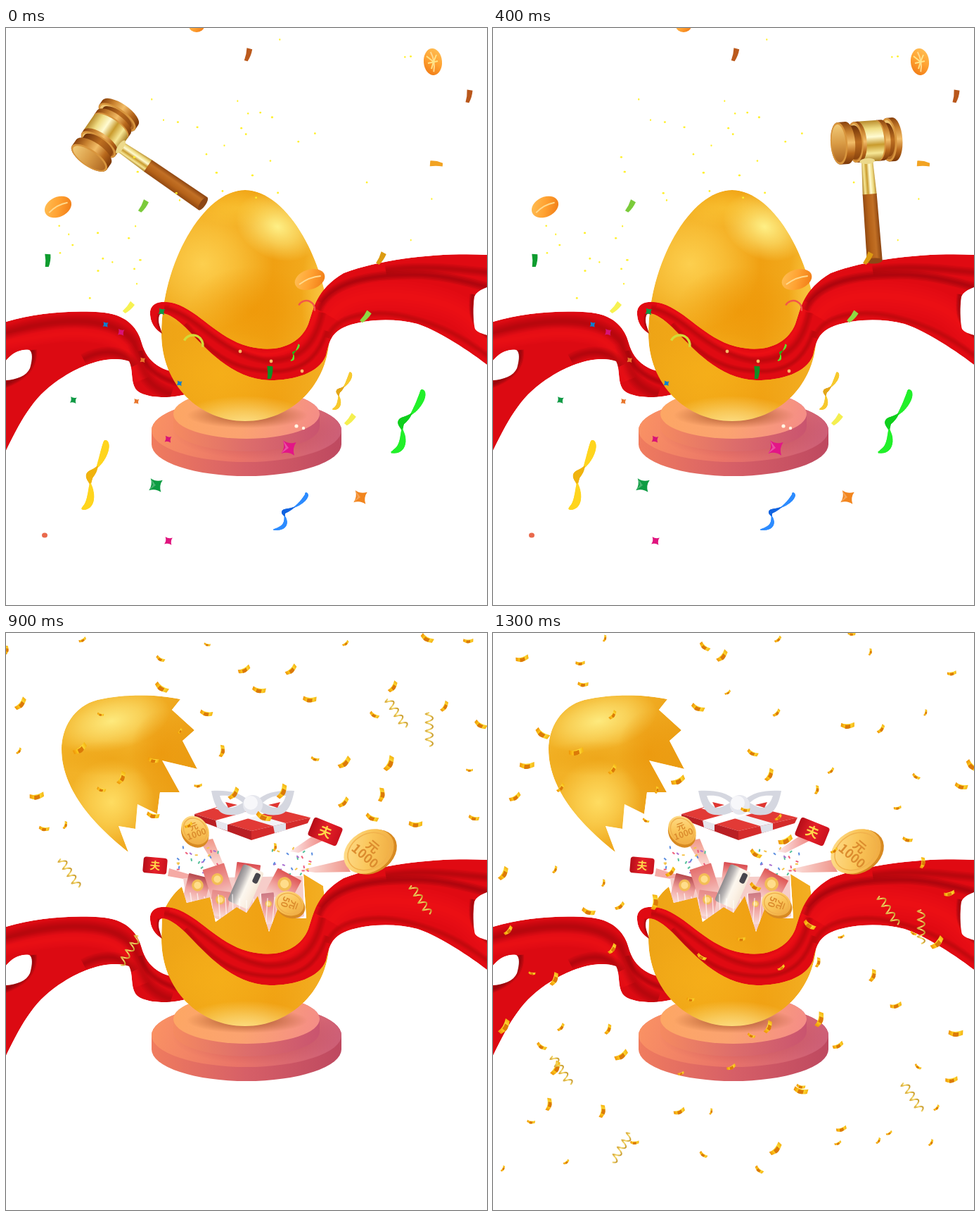
These frames come from a looping animation (684 px wide and 819 px high, 1.5 s). An HTML page with a canvas:

```html
<!DOCTYPE html>
<html lang="zh">
<head>
<meta charset="utf-8">
<style>
html, body { margin: 0; width: 100%; height: 100%; overflow: hidden; background: #fff; }
canvas { display: block; }
</style>
</head>
<body>
<canvas id="stage" width="684" height="819"></canvas>
<script>
const ctx = document.getElementById('stage').getContext('2d');
const TAU = Math.PI * 2;
const STARTS = [0, 200, 400, 600, 800, 900, 1100, 1300];
const LOOP = 1500;

// ---------- helpers ----------
function at(x, y, deg, draw) {
  ctx.save();
  ctx.translate(x, y);
  ctx.rotate(deg * Math.PI / 180);
  draw();
  ctx.restore();
}
function ramp(x0, y0, x1, y1, ...colors) {
  const g = ctx.createLinearGradient(x0, y0, x1, y1);
  colors.forEach((c, i) => g.addColorStop(i / (colors.length - 1), c));
  return g;
}
function fill(path, style) {
  ctx.fillStyle = style;
  ctx.fill(typeof path === 'string' ? new Path2D(path) : path);
}
function line(d, style, width) {
  ctx.strokeStyle = style;
  ctx.lineWidth = width;
  ctx.stroke(new Path2D(d));
}
function oval(x, y, rx, ry, style) {
  ctx.beginPath();
  ctx.ellipse(x, y, rx, ry, 0, 0, TAU);
  ctx.fillStyle = style;
  ctx.fill();
}
function box(w, h, r, style) {
  ctx.beginPath();
  ctx.roundRect(-w / 2, -h / 2, w, h, r);
  ctx.fillStyle = style;
  ctx.fill();
}
function glow(x, y, rx, ry, rgb, alpha, deg = 0) {
  at(x, y, deg, () => {
    ctx.scale(rx, ry);
    const g = ctx.createRadialGradient(0, 0, 0, 0, 0, 1);
    g.addColorStop(0, `rgba(${rgb},${alpha})`);
    g.addColorStop(0.5, `rgba(${rgb},${alpha * 0.55})`);
    g.addColorStop(1, `rgba(${rgb},0)`);
    oval(0, 0, 1, 1, g);
  });
}
// Soft stroke built from narrowing translucent layers.
function fold(d, rgb, width, alpha = 0.08) {
  for (let k = 5; k > 0; k--) line(d, `rgba(${rgb},${alpha})`, width * k / 5);
}
function clipped(path, draw) {
  ctx.save();
  ctx.clip(path);
  draw();
  ctx.restore();
}
function noise(seed) {
  const v = Math.sin(seed * 127.1 + 3.7) * 43758.5453;
  return v - Math.floor(v);
}
function scatter(count, seed, x, y, w, h, draw) {
  for (let i = 0; i < count; i++) draw(x + noise(seed + i) * w, y + noise(seed + i + 500) * h, i);
}

// ---------- pedestal, egg, cloth ----------
function disk(y, rx, ry, h, top, side) {
  ctx.beginPath();
  ctx.ellipse(342, y + h, rx, ry, 0, 0, Math.PI);
  ctx.ellipse(342, y, rx, ry, 0, Math.PI, TAU);
  ctx.fillStyle = ramp(342 - rx, 0, 342 + rx, 0, ...side);
  ctx.fill();
  oval(342, y, rx, ry, ramp(342 - rx, y - ry, 342 + rx, y + ry, ...top));
}
function pedestal() {
  disk(571, 135, 45, 20, ['#fb9463', '#ea7468', '#c95c78'], ['#f07c5e', '#d65f67', '#be4960']);
  glow(354, 572, 118, 40, '160,45,75', 0.45);
  disk(548, 104, 35, 18, ['#fda763', '#fba370', '#f48b89'], ['#f58a60', '#dd6d6b', '#c9546f']);
  glow(343, 550, 86, 18, '150,65,25', 0.75);
}

const EGG = 'M340 230C280 230 221 336 221 434C221 507 275 558 340 558C405 558 460 507 460 434C460 336 400 230 340 230Z';
const SHELL = 'M222 400Q232 374 250 360L257 383L290 375L298 410L328 389L342 397L358 373L374 424L389 384L411 405L427 405L423 342L451 359L460 434C460 507 405 558 340 558C275 558 221 507 221 434Z';

function eggBody(outline, whole) {
  const p = new Path2D(outline);
  clipped(p, () => {
    fill(p, ramp(221, 0, 460, 0, '#eea416', '#f2a818', '#f0a012', '#f3b024'));
    if (whole) {
      glow(280, 335, 100, 95, '255,214,88', 0.85);
      glow(386, 282, 62, 46, '255,244,140', 0.95, 25);
      glow(330, 255, 60, 28, '255,212,70', 0.5);
      glow(350, 400, 90, 62, '238,148,4', 0.6);
      glow(448, 380, 28, 100, '255,215,90', 0.5);
    }
    glow(310, 490, 110, 60, '247,178,26', 0.6);
    glow(340, 566, 105, 44, '255,232,150', 0.95);
  });
}

const CLOTH_LEFT = new Path2D('M0 417C45 404 96 400 140 404C174 408 188 428 193 447C201 476 225 490 256 489L258 519C235 527 194 526 184 512C177 501 181 484 175 473C150 464 111 476 82 495C42 519 24 551 0 600L0 500C15 499 29 494 34 483C38 470 38 460 33 457C20 455 8 462 0 472Z');
const CLOTH_RIGHT = new Path2D('M222 434C212 428 204 418 205 402C207 389 222 386 240 391C275 402 300 440 345 452C385 462 418 450 430 420C438 398 440 372 480 348C540 326 620 319 684 322L684 368C674 372 668 376 666 382C664 396 664 416 667 427C670 432 678 434 684 436L684 478C650 452 610 428 585 420C550 411 510 414 485 423C462 432 460 445 455 465C445 490 410 500 375 500C320 498 285 455 255 425C240 410 222 400 218 408C215 418 220 425 222 434Z');
const DARK = '105,4,10', BRIGHT = '255,30,32';

function clothLeft() {
  clipped(CLOTH_LEFT, () => {
    fill(CLOTH_LEFT, '#dc0a12');
    fold('M-9 436C60 412 150 404 182 446C192 475 190 505 235 520', DARK, 20, 0.07);
    fold('M-9 448C55 436 95 428 140 438C172 446 180 470 192 500', BRIGHT, 24);
    fold('M38 457C40 484 20 498 -9 508', DARK, 12, 0.15);
    fold('M110 470C140 454 170 458 181 480', DARK, 16);
    fold('M192 458C198 486 222 500 258 508', DARK, 10);
  });
}
function clothRight() {
  clipped(CLOTH_RIGHT, () => {
    fill(CLOTH_RIGHT, '#e00a12');
    fold('M444 400C460 362 510 350 580 350C625 350 660 362 694 370', DARK, 14, 0.1);
    fold('M540 344C590 336 640 342 694 348', DARK, 14, 0.07);
    fold('M462 410C480 380 530 374 590 384C640 392 660 406 694 450', BRIGHT, 44);
    fold('M458 440C466 408 520 398 570 410C620 422 650 438 694 472', DARK, 10, 0.05);
    fold('M664 378C660 405 664 424 690 440', DARK, 9, 0.12);
    fold('M225 398C270 403 302 462 370 472C425 474 442 440 450 404', DARK, 12, 0.06);
    fold('M255 420C300 475 340 489 390 487C430 483 446 460 456 430', DARK, 9, 0.06);
    fold('M233 393C285 410 300 452 365 463C425 464 436 420 444 388', BRIGHT, 10);
    fold('M218 406C214 420 220 428 222 434', DARK, 6, 0.1);
  });
}

// ---------- hammer ----------
const WOOD = ['#8a420d', '#c9822f', '#f2bd68', '#b9691c', '#7a3708'];
const GROOVE = ['#6d3007', '#bd6f21', '#8a430d'];
const GOLD = ['#b88a2b', '#efdc83', '#fffbd2', '#c99b2d', '#f7e795', '#a87b20'];

// A short drum whose axis is local y, seen from the +y end.
function drum(y0, y1, r, colors) {
  const ry = r * 0.4;
  ctx.beginPath();
  ctx.ellipse(0, y0, r, ry, 0, Math.PI, TAU);
  ctx.ellipse(0, y1, r, ry, 0, 0, Math.PI);
  ctx.closePath();
  ctx.fillStyle = ramp(-r, 0, r, 0, ...colors);
  ctx.fill();
  if (colors !== WOOD) return;
  oval(0, y1, r, ry, '#d8953d');
  oval(0, y1 + 0.5, r - 3, ry - 2, ramp(-r, 0, r, 0, '#f4cf7c', '#d99b45', '#a85f1c'));
}
function hammer(x, y, deg) {
  at(x, y, deg, () => {
    fill('M26 -8L76 -10V10L26 8Z', ramp(0, -10, 0, 10, ...GOLD));
    fill('M75 -10L170 -11L173 0L170 11L75 10Z', ramp(0, -11, 0, 11, '#8a4310', '#c27025', '#b56219', '#8f4711'));
    oval(170, 0, 4, 11, '#8c4716');
    drum(-40, -32, 31, WOOD);
    drum(-32, -22, 24, GROOVE);
    drum(-24, -17, 29, WOOD);
    drum(-15, 10, 29, GOLD);
    drum(10, 15, 29, WOOD);
    drum(15, 25, 24, GROOVE);
    drum(27, 38, 30, WOOD);
    oval(28, 0, 4, 11, '#ecd98b');
  });
}
const SWINGS = [[140, 153, 34.5], [368, 138, 44.5], [530, 161, 85.7], [449, 208, 44.5], [417, 228, 32]];

// ---------- loose bits around the whole egg ----------
function star(x, y, r, color) {
  at(x, y, 8, () => {
    ctx.scale(r, r);
    fill('M-.86 -.86Q0 -.42 .86 -.86Q.42 0 .86 .86Q0 .42 -.86 .86Q-.42 0 -.86 -.86Z', color);
    if (r > 8) fill('M-.86 -.86L0 0L-.86 .86L-.4 0Z', 'rgba(255,255,255,.25)');
  });
}
function strip(x, y, deg, color) {
  at(x, y, deg, () => fill('M-9 -4Q0 -5 9 -2V3Q0 2 -9 4Z', color));
}
function bean(x, y, rx, ry, deg) {
  at(x, y, deg, () => {
    oval(0, 0, rx, ry, ramp(-rx, -ry, rx, ry, '#ffc35a', '#ffa232', '#ee7410'));
    line(`M${-rx * 0.75} 2Q0 -4 ${rx * 0.75} 0`, '#ffd98c', 2);
  });
}
// Twisted paper ribbon running down-left from (x, y); it narrows wherever it turns over.
function twist(x, y, w, h, light, dark) {
  const point = t => [x - w * (t - 0.16 * Math.sin(t * TAU * 1.5)), y + h * (t - 0.05 * Math.sin(t * TAU * 2))];
  ctx.lineCap = 'round';
  for (let t = 0; t < 1; t += 0.02) {
    const turn = Math.sin(t * TAU * 1.5);
    ctx.beginPath();
    ctx.moveTo(...point(t));
    ctx.lineTo(...point(t + 0.02));
    ctx.strokeStyle = turn > 0 ? light : dark;
    ctx.lineWidth = (0.02 + 0.09 * Math.abs(turn)) * h;
    ctx.stroke();
  }
  ctx.lineCap = 'butt';
}
function arc(x, y, r, color, width) {
  ctx.beginPath();
  ctx.arc(x, y, r, Math.PI * 1.15, TAU + 0.2);
  ctx.strokeStyle = color;
  ctx.lineWidth = width;
  ctx.stroke();
}
function looseBits() {
  const speck = (x, y, i) => oval(x, y, 1 + noise(i) * 0.8, 1.4, '#fff02d');
  scatter(20, 10, 180, 100, 200, 145, speck);
  scatter(14, 40, 75, 280, 130, 105, speck);
  scatter(10, 70, 340, 10, 300, 310, speck);

  const hues = ['#0a7fd0', '#109a45', '#e8762c', '#d81376'];
  scatter(8, 20, 90, 370, 160, 220, (x, y, i) => star(x, y, 4 + i % 2, hues[i % 4]));
  star(213, 649, 10, '#0d9c42');
  star(402, 596, 11, '#e31587');
  star(504, 666, 10, '#f2851e');
  star(231, 728, 6, '#e0147e');

  strip(344, 38, 105, '#bb5a1d');
  strip(658, 97, 100, '#b9571b');
  strip(612, 193, 4, '#f2a322');
  strip(195, 253, 120, '#7bcb3b');
  strip(59, 330, 92, '#0e9c2f');
  strip(174, 397, 132, '#f7f252');
  strip(533, 327, 118, '#dc9b12');
  strip(511, 410, 128, '#8ed943');
  strip(375, 489, 92, '#118d25');
  strip(489, 556, 130, '#f4ef50');

  bean(74, 254, 20, 14, -25);
  bean(432, 357, 22, 14, -18);
  bean(607, 48, 19, 13, 85);
  bean(271, -3, 11, 9, 0);
  line('M598 40L608 48L605 58M608 48L612 38M600 50L614 47', '#ffe487', 2);

  twist(141, 586, 32, 96, '#ffd51e', '#f0b30e');
  twist(489, 489, 24, 52, '#f7c92e', '#e3a61a');
  twist(591, 514, 42, 88, '#22f02a', '#0fcf1d');
  twist(426, 660, 45, 52, '#2d8cff', '#1264e0');
  twist(416, 449, 11, 23, '#62e02c', '#2cab18');
  arc(266, 450, 14, '#d2dc38', 3.5);
  arc(427, 399, 12, '#f2564a', 2.5);
  oval(55, 720, 4, 3.5, '#e9694c');
  oval(413, 565, 2.6, 2.6, '#fff6e4');
  oval(423, 568, 2.2, 2.2, '#fff6e4');
  for (let i = 0; i < 3; i++) oval(333 + i * 44, 459 + i * 14, 2.4, 2.4, '#f7ba67');
}

// ---------- opened egg ----------
function topShell() {
  const p = new Path2D('M248 94C215 87 170 86 130 95C96 104 79 135 79 165C79 225 130 276 174 311L160 274L184 278L187 243L215 257L219 226L247 226L222 181L272 193L251 153L268 138L236 109Z');
  clipped(p, () => {
    fill(p, ramp(80, 150, 260, 200, '#f2b125', '#f3b32a', '#eb9c12'));
    glow(150, 125, 85, 42, '255,240,135', 0.9, -12);
    glow(150, 240, 62, 60, '255,222,100', 0.95);
    glow(150, 178, 90, 25, '234,156,12', 0.5);
    glow(222, 170, 45, 60, '234,145,5', 0.55);
  });
}
function label(text, y, size, color) {
  ctx.fillStyle = color;
  ctx.font = `bold ${size}px "Noto Sans CJK SC", "Noto Sans CJK", sans-serif`;
  ctx.fillText(text, 0, y);
}
function coin(x, y, rx, ry, deg, amount, textDeg, size) {
  at(x, y, deg, () => {
    oval(3, 3, rx, ry, '#d88a22');
    oval(0, 0, rx, ry, ramp(-rx, -ry, rx, ry, '#ffe39a', '#fac65a', '#eca33a'));
    ctx.beginPath();
    ctx.ellipse(0, 0, rx * 0.84, ry * 0.84, 0, 0, TAU);
    ctx.strokeStyle = '#f1b14c';
    ctx.lineWidth = 1.5;
    ctx.stroke();
  });
  at(x, y, textDeg, () => {
    label('元', -size * 0.5, size, '#dc8c2e');
    label(amount, size * 0.45, size, '#dc8c2e');
  });
}
function envelope(x, y, w, h, deg) {
  at(x, y, deg, () => {
    box(w, h, 4, ramp(-w / 2, 0, w / 2, 0, '#b60d18', '#e5202a', '#cb111d'));
    label('夫', 0, h * 0.65, '#ffd94a');
  });
}
function giftLid() {
  fill('M268 257L332 237L433 262L349 281Z', '#e23a36');
  fill('M268 257L349 281V294L268 264Z', '#b91f24');
  fill('M349 281L433 262L429 270L349 294Z', '#d42b2b');
  fill('M296 249L310 245L398 270L380 274Z', '#f3f3f7');
  fill('M380 274L398 270V280L382 284Z', '#dfe0e8');
  fill('M371 246L389 250L315 272L298 266Z', '#fff');
  fill('M298 266L315 271V281L300 276Z', '#e6e6ed');
  for (const side of [-1, 1]) at(351, 243, 0, () => {
    ctx.scale(side, 1);
    fill('M4 -4C20 -18 36 -20 59 -19C56 -4 51 14 36 15C20 17 12 12 4 6Z', '#d5d7e0');
    fill('M14 -2C25 -12 36 -13 47 -12C44 -2 38 5 31 5C24 4 18 0 14 -2Z', '#fff');
    fill('M22 1L39 -3L35 5Z', '#df3632');
  });
  oval(351, 244, 14, 14, '#e6e7ee');
  oval(348, 241, 10, 10, '#f7f7fa');
}
function packet(x, y, w, h, deg, color) {
  at(x, y, deg, () => {
    box(w, h, 1, ramp(0, -h / 2, 0, h / 2, color, '#f0a09c', '#f9dbd8'));
    oval(0, -h * 0.15, w * 0.26, w * 0.26, '#f3bd55');
    oval(0, -h * 0.15, w * 0.16, w * 0.16, '#ffdd8b');
  });
}
function gifts() {
  // pale trails behind the flying prizes
  fill('M276 296L294 292L309 328L298 332Z', ramp(0, 295, 0, 332, '#f19b8d', '#fbe0dc'));
  fill('M439 286L452 294L416 312L404 310Z', ramp(450, 0, 404, 0, '#f08a85', '#fdeceb'));
  fill('M232 334L230 345L258 350L262 343Z', '#f5aaa5');
  fill('M481 322L490 339L440 340L416 337Z', ramp(488, 0, 418, 0, '#ef958a', '#fdeae7'));
  const hues = ['#ef5c78', '#5a8de0', '#53c09a', '#f4c34a', '#a86fd0'];
  const crumb = (x, y, i) => at(x, y, i * 40, () => fill('M-2 -1H2V1H-2Z', hues[i % 5]));
  scatter(24, 5, 244, 304, 58, 40, crumb);
  scatter(24, 95, 378, 304, 58, 40, crumb);
  fill('M252 348L422 345L424 402L374 422L300 406L257 382Z', '#f6cdc9');
  packet(271, 364, 32, 40, 14, '#b6474c');
  packet(303, 357, 32, 54, -18, '#e46f6d');
  packet(343, 344, 34, 34, 8, '#d9484d');
  packet(393, 362, 38, 44, 28, '#df5553');
  packet(374, 391, 18, 44, -6, '#cc7984');
  packet(304, 384, 26, 36, 8, '#e68b89');
  at(341, 360, 24, () => {
    box(32, 57, 4, ramp(-16, 0, 16, 0, '#8e8a8d', '#b9b5b5', '#fcf7ef', '#fbf1e5', '#f5e8d8'));
    at(9, -17, 0, () => box(8, 15, 3, '#47454c'));
  });
  for (let x = 262; x < 400; x += 10) {
    line(`M${x} ${368 + noise(x) * 12}L${x + (340 - x) * 0.08} 415`, 'rgba(255,255,255,.65)', 1.5);
  }
}
function openedEgg() {
  pedestal();
  clothLeft();
  gifts();
  eggBody(SHELL, false);
  clothRight();
  topShell();
  giftLid();
  envelope(212, 330, 34, 23, 5);
  envelope(454, 282, 44, 28, 22);
  coin(269, 280, 22, 18, 50, '1000', -20, 12);
  coin(516, 310, 38, 29, -32, '1000', 40, 18);
  coin(403, 384, 21, 17, 20, '50', 110, 13);
}

// ---------- falling gold ----------
function flake(x, y, seed) {
  const s = 0.4 + noise(seed + 31) * 0.6;
  at(x, y, noise(seed) * 130 - 75, () => {
    ctx.scale(s, s);
    fill('M-11 -2Q-2 1 10 -6L11 1Q0 9 -11 4Z', ramp(-10, 0, 10, 0, '#f09a0a', '#ffd21f', '#ffe23c', '#f5b514'));
    fill('M-4 0Q1 0 4 -2L5 4Q0 7 -4 6Z', '#dc7a08');
  });
}
function coil(x, y, deg) {
  at(x, y, deg, () => {
    ctx.beginPath();
    for (let d = -24; d <= 24; d++) {
      const a = d / 48 * TAU * 4;
      ctx.lineTo(d + Math.cos(a), 5 * Math.sin(a));
    }
    ctx.strokeStyle = ramp(0, -5, 0, 5, '#c79a2e', '#f6d969', '#d7ab3e');
    ctx.lineWidth = 2;
    ctx.stroke();
  });
}
// One flake per cell of a jittered grid.
function shower(columns, rows, height, seed) {
  const w = 684 / columns, h = height / rows;
  for (let i = 0; i < columns * rows; i++) {
    const x = (i % columns + noise(seed + i)) * w;
    const y = (Math.floor(i / columns) + noise(seed + i + 400)) * h;
    flake(x, y, seed + i);
  }
}
function goldRain(step) {
  if (step === 0) shower(9, 5, 310, 50);
  else at(0, step === 1 ? -52 : 0, 0, () => shower(9, 11, 790, 140));
  at(step * 3.5, step * 140, 0, () => {
    coil(555, 113, 58);
    coil(602, 136, 90);
    coil(90, 340, 58);
    coil(589, 378, 58);
    coil(176, 450, 122);
  });
}

// ---------- playback ----------
function render(step) {
  ctx.clearRect(0, 0, 684, 819);
  if (step < SWINGS.length) {
    pedestal();
    clothLeft();
    eggBody(EGG, true);
    clothRight();
    hammer(...SWINGS[step]);
    looseBits();
  } else {
    openedEgg();
    goldRain(step - SWINGS.length);
  }
}
ctx.textAlign = 'center';
ctx.textBaseline = 'middle';
let shown = -1;
function tick() {
  const t = performance.now() % LOOP;
  const step = STARTS.findLastIndex(s => t >= s);
  if (step !== shown) render(shown = step);
  requestAnimationFrame(tick);
}
tick();
</script>
</body>
</html>
```
